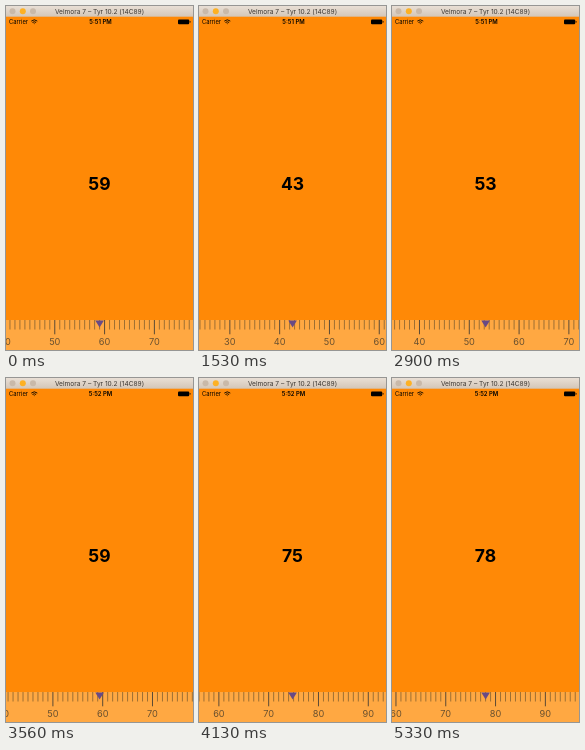
Recreate the animation shown at these times as an HTML page. Size 187x344 px, loop 6200 ms.

```html
<!DOCTYPE html>
<html lang="en">
<head>
<meta charset="utf-8">
<title>Ruler picker</title>
<style>
  html, body { margin: 0; width: 100%; height: 100%; overflow: hidden; background: #ff8906; }
  svg { display: block; width: 100vw; height: 100vh; font-family: Inter, Roboto, sans-serif; }
  text { text-anchor: middle; }
</style>
</head>
<body>
<svg viewBox="0 0 187 344">
  <defs>
    <linearGradient id="bar" x2="0" y2="1">
      <stop stop-color="#e9dfd5"/>
      <stop offset="1" stop-color="#d3c6b8"/>
    </linearGradient>
  </defs>
  <rect width="187" height="344" fill="#ff8906"/>

  <!-- Window title -->
  <rect width="187" height="10.7" fill="url(#bar)"/>
  <circle cx="6.5" cy="5.3" r="3" fill="#c9b9a9"/>
  <circle cx="16.8" cy="5.3" r="3" fill="#fdb124"/>
  <circle cx="27" cy="5.3" r="3" fill="#c9b9a9"/>
  <text x="93.5" y="7.8" font-size="6.6" fill="#3d3833">Velmora 7 – Tyr 10.2 (14C89)</text>

  <!-- Status bar -->
  <text x="3" y="18" font-size="5.8" style="text-anchor:start">Carrier</text>
  <g fill="none" stroke="#000" stroke-width=".9">
    <path d="M25.3 15.1q3-2.6 6 0M26.5 16.5q1.8-1.5 3.6 0"/>
    <path d="M28.3 18.3l-.8-.9h1.6z" fill="#000" stroke="none"/>
  </g>
  <text id="clock" x="94.5" y="18" font-size="5.9" font-weight="600"></text>
  <rect x="172" y="13.4" width="11.2" height="4.8" rx="1"/>
  <rect x="183.6" y="14.9" width=".9" height="1.8" rx=".4"/>

  <text id="number" x="93.5" y="183.6" font-size="17.5" font-weight="700"></text>

  <!-- Ruler -->
  <rect y="314" width="187" height="30" fill="#ffa842"/>
  <g id="ruler" fill="#69502f" font-size="9.2">
    <path id="minor" stroke="#7d5c2e" stroke-width=".75"/>
    <path id="major" stroke="#5b4a35" stroke-width="1"/>
  </g>
  <path d="M89.3 314.5h8.6l-4.3 7z" fill="#694a85"/>
</svg>
<script>
const LOOP = 6200, STEP = 4.98, CENTER = 93.6;
const $ = id => document.getElementById(id);

// [time, value]: drags, pauses and snaps to the nearest whole unit
const keys = [
  [0, 59], [1070, 59], [1530, 42.6], [1700, 42.6], [1930, 43],
  [2370, 43], [2400, 44.1], [2660, 53.4], [2830, 53.4], [3060, 53],
  [3370, 53], [3560, 59.34], [3930, 73.5], [4000, 73.5], [4130, 74.8],
  [4630, 76.2], [4830, 77.2], [5260, 77.9], [5330, 78], [LOOP, 78]
];

function valueAt(t) {
  const i = keys.findIndex(k => k[0] > t);
  const [t0, v0] = keys[i - 1], [t1, v1] = keys[i];
  return v0 + (v1 - v0) * (t - t0) / (t1 - t0);
}

let minor = "", major = "";
for (let n = 0; n <= 110; n++) {
  const x = n * STEP;
  if (n % 10) {
    minor += `M${x} 314v9.5`;
    continue;
  }
  major += `M${x} 314v14.3`;
  const label = document.createElementNS("http://www.w3.org/2000/svg", "text");
  label.setAttribute("x", x);
  label.setAttribute("y", 339);
  label.textContent = n;
  $("ruler").append(label);
}
$("minor").setAttribute("d", minor);
$("major").setAttribute("d", major);

function draw(now) {
  const t = now % LOOP, value = valueAt(t);
  $("ruler").setAttribute("transform", `translate(${CENTER - value * STEP})`);
  $("number").textContent = Math.round(value);
  $("clock").textContent = t < 2960 ? "5:51 PM" : "5:52 PM";
}

const start = performance.now();
function tick() {
  draw(performance.now() - start);
  requestAnimationFrame(tick);
}
tick();
</script>
</body>
</html>
```
